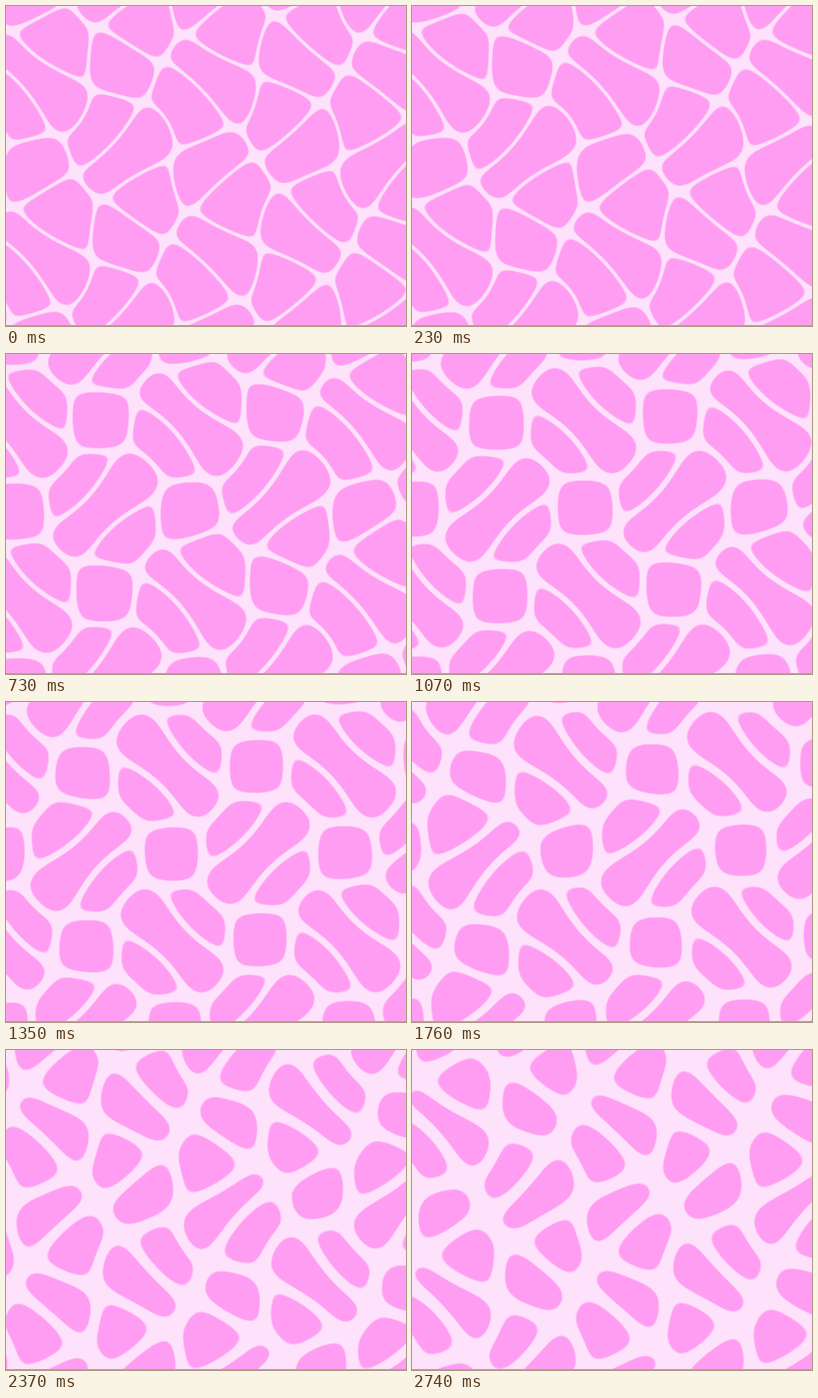
An HTML page with a canvas for the animation above (2790 ms loop, 400 by 320 pixels).

```html
<!DOCTYPE html>
<html lang="en">
<head>
<meta charset="utf-8">
<title>Drifting cells</title>
<style>
  html, body { margin: 0; height: 100%; overflow: hidden; background: #fee1fb; }
  canvas { display: block; }
</style>
</head>
<body>
<canvas id="stage" width="400" height="320"></canvas>
<script>
const W = 400, H = 320, LOOP = 2790, STEPS = 60;
const ctx = document.getElementById('stage').getContext('2d');
const image = ctx.createImageData(W, H);
const CELL = [254, 157, 241], GAP = [254, 225, 251], EDGE = [180, 160, 178];

// The tissue repeats along two nearly perpendicular vectors.
const A = [175, -4], B = [4, 174], ORIGIN = [84, 68];
const DRIFT = [-31.25, 0.71], HALF_PERIOD = 2.8;

// Blocks turn from square (phase -1) to bar (phase 1) and back.
const blocks = [
  { u: 0, v: 0, phase: -1, tilt: -1 },
  { u: .5, v: 0, phase: 1, tilt: -1 },
  { u: .5, v: .5, phase: -1, tilt: 1 },
  { u: 0, v: .5, phase: 1, tilt: 1 }
];
// Drops lie on both sides of each bar.
const drops = [
  { u: .5, v: 0, dx: 8.5, side: -1, shrink: 1 },
  { u: .5, v: 0, dx: -8.5, side: 1, shrink: 1 },
  { u: 0, v: .5, dx: -8.5, side: -1, shrink: -1 },
  { u: 0, v: .5, dx: 8.5, side: 1, shrink: -1 }
];
const cells = [...blocks, ...drops], N = cells.length;
const q = new Float64Array(N), gx = new Float64Array(N), gy = new Float64Array(N);

// Weighted squared distance to the nearest copy of a cell, with its gradient.
function measure(i, dx, dy, a, c, h) {
  const m = Math.round(dy / B[1]);
  dx -= m * B[0]; dy -= m * B[1];
  const n = Math.round(dx / A[0]);
  dx -= n * A[0]; dy -= n * A[1];
  q[i] = a * (dx * dx + dy * dy) + 2 * c * dx * dy + h;
  gx[i] = 2 * (a * dx + c * dy);
  gy[i] = 2 * (a * dy + c * dx);
}

// Rounded distance from the border of the cell that owns the point.
function borderDistance(x, y, t, round) {
  const p = Math.PI * (t - .0023 * (x - 100) - .0006 * (y - 120) - 1) / HALF_PERIOD;
  const C = Math.cos(p), S = Math.sin(p);
  for (let i = 0; i < 4; i++) {
    const k = blocks[i], bar = (1 + k.phase * C) / 2;
    measure(i, x - k.x + 9 * k.phase * S, y - k.y - 11 * k.phase * k.tilt * S,
      1 + .5 * bar, k.tilt * (.8 * bar + .2 * S * S), 1130 - 2063 * bar - 400 * S * S);
  }
  for (let i = 4; i < N; i++) {
    const k = cells[i];
    measure(i, x - k.x - k.dx * (1 + 1.5 * S * S), y - k.y - k.side * (43.75 - 35.25 * C),
      1, 0, 120 * k.shrink * S - 100);
  }
  let own = 0;
  for (let i = 1; i < N; i++) if (q[i] < q[own]) own = i;
  let sum = 1e-9;
  for (let i = 0; i < N; i++) {
    if (i === own) continue;
    const ex = gx[i] - gx[own], ey = gy[i] - gy[own];
    const d = (q[i] - q[own]) / (Math.sqrt(ex * ex + ey * ey) + 1e-6);
    if (d < 40) sum += Math.exp(-d / round);
  }
  return -round * Math.log(sum);
}

function draw(t) {
  const gap = 1.6 + 4.2 * Math.pow(t * 1000 / LOOP, 1.4), round = 4 + .9 * t;
  for (const k of cells) {
    k.x = ORIGIN[0] + k.u * A[0] + k.v * B[0] + DRIFT[0] * (t - 1.07);
    k.y = ORIGIN[1] + k.u * A[1] + k.v * B[1] + DRIFT[1] * (t - 1.07);
  }
  const data = image.data;
  for (let y = 0, o = 0; y < H; y++) {
    for (let x = 0; x < W; x++, o += 4) {
      const last = y === H - 1;
      const d = last ? 0 : borderDistance(x + .5, y + .5, t, round) - gap;
      const f = Math.min(1, Math.max(0, d / 1.5 + .5));
      for (let j = 0; j < 3; j++) data[o + j] = last ? EDGE[j] : GAP[j] + (CELL[j] - GAP[j]) * f;
      data[o + 3] = 255;
    }
  }
  ctx.putImageData(image, 0, 0);
}

let shown = -1;
function tick() {
  const step = Math.floor(performance.now() % LOOP / LOOP * STEPS);
  if (step !== shown) {
    shown = step;
    draw(step * LOOP / STEPS / 1000);
  }
  requestAnimationFrame(tick);
}
tick();
</script>
</body>
</html>
```
